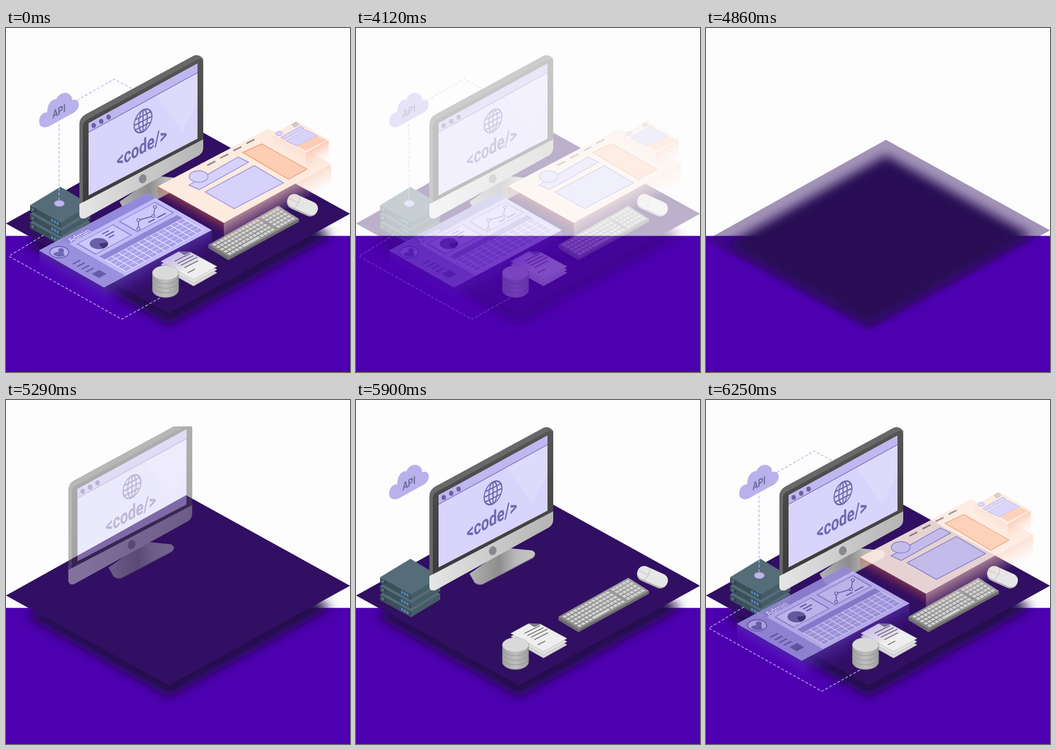
An HTML page that plays this animation: 600 by 600 pixels, repeating every 6320 ms.

```html
<!DOCTYPE html>
<html lang="en">
<head>
<meta charset="utf-8">
<title>Isometric desk</title>
<style>
html, body { margin: 0; width: 100%; height: 100%; overflow: hidden; background: #fdfdfd; }
svg { display: block; width: 100vw; height: 100vh; }
text { font-family: Roboto, "Liberation Sans", sans-serif; }
</style>
</head>
<body>
<svg id="stage" viewBox="0 0 600 600"></svg>
<script>
const LOOP = 6320, FADE_START = 3720, BUILD_START = 4660;
const BUILD_STEPS = [4660, 4700, 4740, 4780, 4820, 4860, 4920, 4990, 5070, 5140, 5220, 5290, 5360,
  5430, 5500, 5570, 5640, 5700, 5770, 5840, 5900, 5980, 6040, 6110, 6180, 6250];

// Markup helpers
const poly = (points, fill, more = '') => `<polygon points="${points}" fill="${fill}" ${more}/>`;
const path = (d, fill, more = '') => `<path d="${d}" fill="${fill}" ${more}/>`;
const line = (d, stroke, width, more = '') =>
  `<path d="${d}" fill="none" stroke="${stroke}" stroke-width="${width}" ${more}/>`;
const oval = (x, y, rx, ry, fill, more = '') =>
  `<ellipse cx="${x}" cy="${y}" rx="${rx}" ry="${ry}" fill="${fill}" ${more}/>`;
const rect = (x, y, w, h, fill, more = '') =>
  `<rect x="${x}" y="${y}" width="${w}" height="${h}" fill="${fill}" ${more}/>`;
const plane = (matrix, body) => `<g transform="matrix(${matrix})">${body}</g>`;
const outline = (color, width = 1.5) => `stroke="${color}" stroke-width="${width}"`;
const repeat = (n, make) => Array.from({ length: n }, (_, i) => make(i)).join('');
const gradient = (id, stops, dir = 'x2="0" y2="1"') => `<linearGradient id="${id}" ${dir}>` +
  stops.map(([at, color, alpha = 1]) =>
    `<stop offset="${at}" stop-color="${color}" stop-opacity="${alpha}"/>`).join('') + '</linearGradient>';
// A wall hanging below the edge from (x, y), fading downwards
const wall = (x, y, dx, dy, height, fill) =>
  plane([dx / 100, dy / 100, 0, 1, x, y], rect(0, 0, 100, height, fill));

const defs = `<defs>
  <filter id="blur" x="-20%" y="-20%" width="140%" height="140%"><feGaussianBlur stdDeviation="9"/></filter>
  <clipPath id="frame"><rect y="46" width="600" height="554"/></clipPath>
  ${gradient('bezel', [[0, '#555555'], [1, '#3b3b3b']])}
  ${gradient('chin', [[0, '#e6e6e6'], [.55, '#c9c9c9'], [1, '#b4b4b4']], 'x2="1" y2="0"')}
  ${gradient('foot', [[0, '#b2b2b2'], [.45, '#8d8d8d'], [.7, '#b9b9b9'], [1, '#c6c6c6']], 'x2="1" y2="0"')}
  ${gradient('keys', [[0, '#a2a2a2'], [1, '#858585']])}
  ${gradient('drum', [[0, '#a2a2a2'], [.5, '#c0c0c0'], [1, '#a0a0a0']], 'x2="1" y2="0"')}
  ${gradient('violetGlow', [[0, '#7a5cf0', .36], [1, '#4a00c8', 0]])}
  ${gradient('rustGlow', [[0, '#c8603c', .5], [1, '#8a2040', 0]])}
  ${gradient('peachGlow', [[0, '#fbcdb8', .62], [1, '#fbcdb8', 0]])}
  ${gradient('boxLeft', [[0, '#fde0d3'], [1, '#fdebe0', .1]])}
  ${gradient('boxRight', [[0, '#fbcbb4'], [1, '#fde3d6', .15]])}
</defs>`;

function server() {
  const slab = i => {
    const y = 30 - i * 15;
    return `<g transform="translate(0 ${y})">` +
      poly('42,309 96,339 96,349 42,319', '#3b5059') +
      poly('96,339 147,308 147,318 96,349', '#465d68') +
      poly('42,309 95,277 147,308 96,339', '#546d79') +
      plane([.54, .3, 0, 1, 42, 309],
        rect(6, 3.5, 5, 3, '#6d8792') + rect(15, 3.5, 4, 3, '#26383f') +
        repeat(3, k => rect(68 + k * 9, 2.5, 6, 5, '#5b87bd'))) + '</g>';
  };
  return poly('46,314 95,290 143,316 143,340 96,370 46,341', '#263840') + repeat(3, slab);
}

const cloud = () =>
  path('M58 165C57 155 63 147 72 147C72 134 78 124 88 124C91 116 100 111 108 114C114 117 116 122 115 126' +
    'C121 123 127 127 127 133C127 140 122 147 112 151L74 172C66 175 58 172 58 165Z', '#b9b1eb') +
  plane([.75, -.41, 0, 1, 81, 158], '<text font-size="19" font-weight="700" fill="#6a6c98">API</text>');

function monitor() {
  const ink = '#7068ac';
  const stand = path('M198 303L206 317Q210 322 220 321L308 275Q313 271 312 267Q310 262 303 262L262 258Z', 'url(#foot)') +
    line('M206 317Q210 323 220 321.500L308 275.500Q312 272 312 268', '#8f8f8f', 1.2);
  const body =
    path('M128 300V325Q128 334 138 332L337 222Q344 217 344 209V188Z', 'url(#chin)') +
    path('M128 307V168Q128 157 138 151L328 48Q337 45 344 54V194Z', '#686868') +
    path('M134 304V172Q134 164 141 160L334 55Q343 51 344 60V194Z', 'url(#bezel)') +
    oval(238.5, 263, 6.5, 8, '#8b8690', 'transform="rotate(18 238.500 263)"');
  const screen = poly('144,166 334,62 334,193 144,292', '#d8d4fc') +
    poly('254,106 307,181 334,130 334,62', '#e4e0fd', 'opacity=".55"') +
    poly('144,166 334,62 334,78 144,182', '#bfb7ef') +
    line('M144 182L334 78', '#7a70b4', 1.2) +
    repeat(3, i => oval(153 + i * 13, 170 - i * 7.3, 3.8, 4.3, '#6a619f'));
  const globe = plane([.82, -.42, 0, 1, 239, 162], `<g fill="none" ${outline(ink, 2.4)}>
    <circle r="19"/><ellipse rx="9" ry="19"/><path d="M0-19V19M-19 0H19M-16-9H16M-16 9H16"/></g>`);
  const code = plane([.72, -.4, 0, 1, 193, 244],
    `<text font-size="34" font-weight="700" fill="${ink}">&lt;code/&gt;</text>`);
  return stand + body + screen + globe + code;
}

function keyboard() {
  const key = (x, y, w) => rect(x, y, w, 12, '#d3d3d3');
  const row = r => {
    const y = 8 + r * 18;
    const main = r < 4
      ? repeat(13, c => key(3 + c * 5.1, y, 4))
      : repeat(4, c => key(3 + c * 5.1, y, 4)) + key(23.5, y, 24) + repeat(4, c => key(49 + c * 5.1, y, 4));
    return main + repeat(5, c => key(72.5 + c * 5.1, y, 4));
  };
  return poly('353,378 353,384 388,405 511,338 511,333 389,399', '#6f6f6f') +
    poly('353,378 475,310 511,333 389,400', 'url(#keys)') +
    plane([1.22, -.68, .36, .22, 353, 378], repeat(5, row));
}

const mouse = () => `<g transform="translate(517 309) rotate(24)">
  ${rect(-28, -11.5, 56, 25, '#b4b4b4', 'rx="13"')}${rect(-28, -13, 56, 23.500, '#e6e6e6', 'rx="12"')}
  ${line('M-11 -12.500Q-5 -2 -11 9.500M-27 -1H-8', '#bcbcbc', 1)}</g>`;

function papers() {
  const sheet = (dy, fill) => `<g transform="translate(0 ${dy})">` +
    poly('270,407 301,390 322,391 368,416 327,439', fill, outline('#b5b5b5', .7)) + '</g>';
  const rows = [[294, 407, 27], [299, 411, 28], [305, 414, 29], [311, 418, 24], [317, 427, 13]];
  return sheet(11, '#d8d8d8') + sheet(5.5, '#e2e2e2') + sheet(0, '#eeeeee') +
    poly('301,390 322,391 311,396', '#777582') +
    rows.map(([x, y, w]) => line(`M${x} ${y}l${w} ${-w * .5}`, '#77757c', 1.6)).join('');
}

function database() {
  const band = i => {
    const y = 457 - i * 8;
    return path(`M255.500 ${y - 8}V${y}A22.700 13 0 0 0 301 ${y}V${y - 8}Z`, 'url(#drum)', outline('#8e8e8e', .9));
  };
  return repeat(4, band) + oval(278.2, 427, 22.7, 12.5, '#dadada', outline('#bdbdbd', .8));
}

function admin() {
  const dark = '#655ba6', card = `${outline('#8a80d2', 1)}`;
  const table = rect(24, 53, 72, 9, '#9086d6') + rect(24, 62, 72, 32, '#aaa1ea') +
    line(repeat(13, i => `M${24 + i * 6} 62V94`) + repeat(6, i => `M24 ${62 + i * 6.4}H96`), '#e6e2fd', .8);
  const floor = rect(0, 0, 100, 100, '#c2bbf7') + rect(0, 0, 100, 13, '#9389da') +
    rect(0, 0, 20, 100, '#9a90de') +
    rect(24, 19, 33, 28, '#cdc7fa', card) + rect(63, 19, 33, 28, '#cdc7fa', card) + table +
    line(repeat(4, i => `M4.500 ${44 + i * 7}h7`), dark, 2.2) + rect(5.5, 72, 7, 11, dark) +
    line('M44 24h6M44 29h8M44 34h5', dark, 1.8) + line('M76 42h6M84 42h8', dark, 1.8);
  return wall(58, 388, 114, 65, 42, 'url(#violetGlow)') + wall(172, 453, 187, -102, 46, 'url(#violetGlow)') +
    plane([1.88, -1, 1.13, .645, 58, 388], floor) +
    oval(93, 391, 16.5, 9.8, '#b9b1f0', outline('#564b98', 1.2)) +
    path('M82 395Q86 390 92 391Q89 385 95 384Q102 384 101 389Q99 393 103 397Q92 402 82 395Z', '#6f65b2') +
    plane([.88, -.47, .87, .5, 114, 374], '<text font-size="14" fill="#f1effe">Admin</text>') +
    oval(162, 376, 16, 9.7, '#6a60a8') + path('M162 376L178 374Q179 382 168 385Z', '#40366f') +
    line('M231 350L231 335L257 328L260 312', '#554b98', 1.3) +
    [[231, 350], [231, 335], [257, 328], [260, 312]]
      .map(([x, y]) => oval(x, y, 2.8, 2.2, '#ddd9fc', outline('#554b98', 1.1))).join('');
}

function webPage() {
  const lilac = outline('#968cd8', 1.4);
  const page = wall(265, 276, 115, 64, 24, 'url(#rustGlow)') + wall(380, 340, 187, -103, 38, 'url(#peachGlow)') +
    poly('265,276 458,175 567,237 380,340', '#fdebe0') +
    line(repeat(4, i => `M${351 + i * 22.800} ${239.500 - i * 12.700}l14 -7`), '#8b8888', 2.6) +
    poly('413,217 446,202 525,246 493,264', '#fdcdb4', outline('#e9a27a')) +
    poly('319,274 405,225 423,234 337,282', '#d6d2fb', lilac) +
    oval(336, 259, 16.5, 10, '#d6d2fb', lilac) +
    poly('347,286 433,240 484,270 398,315', '#d6d2fb', lilac);
  const box = wall(465, 186, 58, 32, 28, 'url(#boxLeft)') + wall(523, 218, 40, -23, 32, 'url(#boxRight)') +
    poly('465,186 508,162 563,195 523,218', '#fdebe0') +
    line('M498 169l9 -5M500 171l9 -5M502 173l9 -5', '#85818a', 1) +
    poly('479,191 514,171 520,175 485,195', '#d6d2fb', outline('#aaa1e2', .8)) +
    poly('488,197 522,177 543,188 508,206', '#d6d2fb', outline('#aaa1e2', .8)) +
    poly('508,206 543,188 559,196 523,214', '#fccdb4') +
    oval(476, 184, 6, 3.8, '#d6d2fb', outline('#aaa1e2', .8));
  return page + box;
}

const links = () =>
  line('M92.500 300V163M124 126L189 89L222 107M66 361L5 398L202 508L270 470', '#b9b0ea', 1.3, 'stroke-dasharray="5 3"') +
  oval(93, 306, 9, 5.5, '#bdb5ec', outline('#8f88c0', .9));

// Parts in drawing order; each slides in from (dx, dy) while it fades in
const parts = [
  { draw: () => poly('314,222 568,362 284,518 36,378', '#200a48', 'filter="url(#blur)"'), from: 4620, to: 4860, dx: 0, dy: 0 },
  { draw: () => poly('0,341 314,166 600,324 284,498', '#310f62'), from: 4780, to: 4960, dx: 0, dy: 52 },
  { draw: server, from: 5350, to: 5560, dx: -36, dy: 20 },
  { draw: monitor, from: 5195, to: 5400, dx: -36, dy: -20 },
  { draw: cloud, from: 5690, to: 5890, dx: 0, dy: -20 },
  { draw: keyboard, from: 5480, to: 5690, dx: -36, dy: 20 },
  { draw: mouse, from: 5560, to: 5760, dx: -36, dy: 20 },
  { draw: papers, from: 5600, to: 5810, dx: -36, dy: -20 },
  { draw: admin, from: 5980, to: 6283, dx: -36, dy: 20 },
  { draw: database, from: 5680, to: 5880, dx: 0, dy: -20 },
  { draw: webPage, from: 5980, to: 6283, dx: 34, dy: -19 },
  { draw: links, from: 5940, to: 6170, dx: 0, dy: 0 }
];

const stage = document.getElementById('stage');
stage.innerHTML = defs + rect(0, 0, 600, 600, '#fdfdfd') + rect(0, 362.6, 600, 238, '#4d00b0') +
  `<g id="scene" clip-path="url(#frame)">${parts.map(p => `<g class="part">${p.draw()}</g>`).join('')}</g>`;
const scene = document.getElementById('scene');
const groups = [...document.querySelectorAll('.part')];
const clamp = x => Math.min(1, Math.max(0, x));

function render(t) {
  const building = t >= BUILD_START;
  const fading = t >= FADE_START && !building;
  scene.setAttribute('opacity', fading ? clamp(1 - (Math.floor((t - FADE_START) / 40) + 1) / 16) : 1);
  const held = BUILD_STEPS.filter(s => s <= t).pop();
  parts.forEach(({ from, to, dx, dy }, i) => {
    const p = building ? clamp((held - from) / (to - from)) : 1;
    groups[i].setAttribute('opacity', p);
    groups[i].setAttribute('transform', `translate(${dx * (1 - p)} ${dy * (1 - p)})`);
  });
}

const start = performance.now();
function tick() {
  render((performance.now() - start) % LOOP);
  requestAnimationFrame(tick);
}
tick();
</script>
</body>
</html>
```
